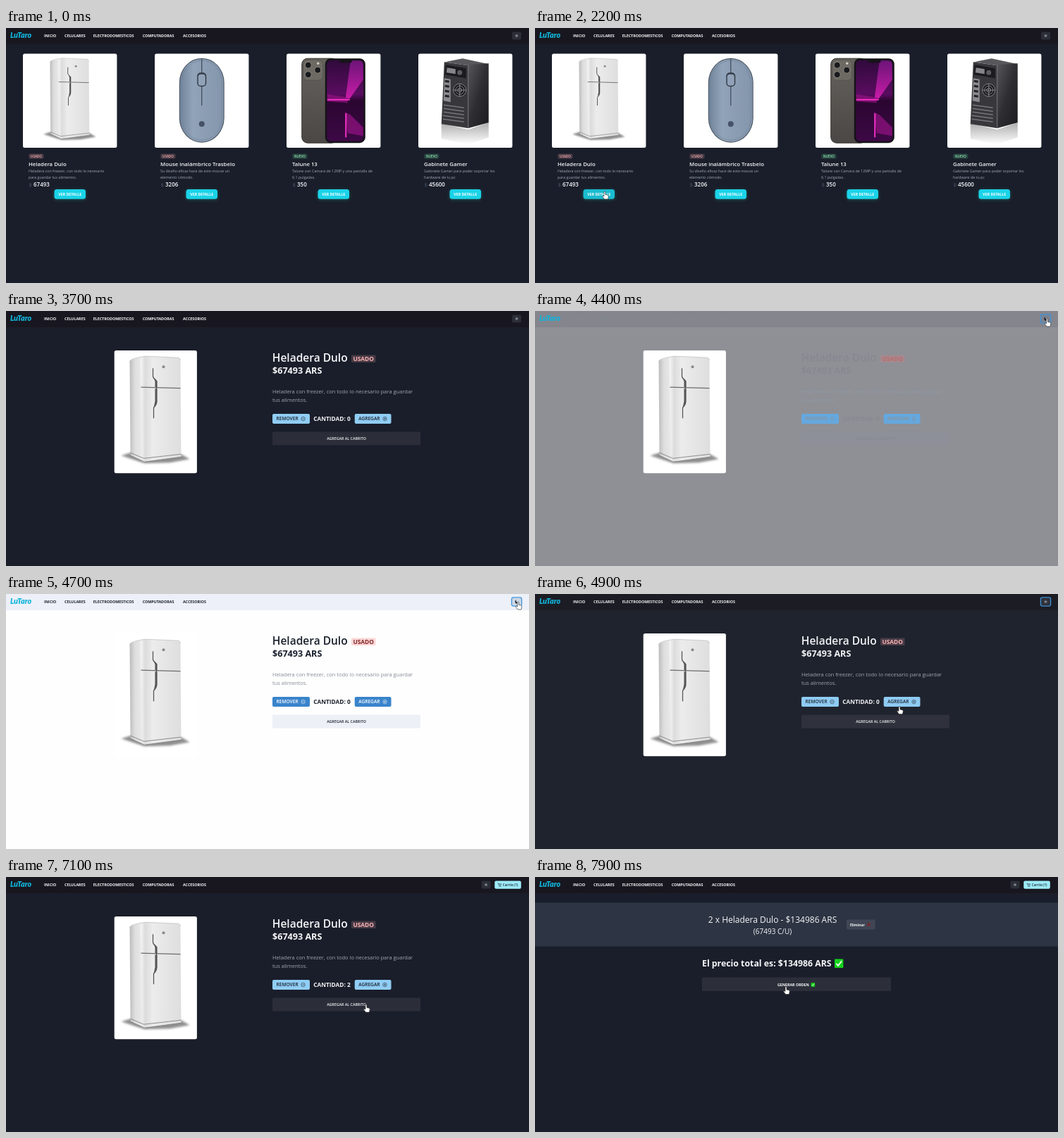
Write an HTML page that moves like this. It is 742x362 px and loops after 8000 ms.

```html
<!DOCTYPE html>
<html lang="es">
<head>
<meta charset="utf-8">
<style>
  html, body { margin: 0; width: 100%; height: 100%; overflow: hidden; background: #1a1f2b; }
  svg { display: block; width: 742px; height: 362px; font-family: "Open Sans", "Noto Sans", sans-serif; }
  text { white-space: pre; }
  .brand { font-family: Lato, sans-serif; font-style: italic; }
  .glow { filter: drop-shadow(0 1.5px 2px #1b5a58); }
  .soft { filter: blur(1.5px); }
</style>
</head>
<body>
<svg id="stage" viewBox="0 0 742 362">
  <defs>
    <linearGradient id="side"><stop stop-color="#bcbcbc"/><stop offset=".35" stop-color="#dedede"/><stop offset="1" stop-color="#ededed"/></linearGradient>
    <linearGradient id="door"><stop stop-color="#f6f6f6"/><stop offset=".12" stop-color="#dcdcdc"/><stop offset=".3" stop-color="#ececec"/><stop offset="1" stop-color="#dedede"/></linearGradient>
    <linearGradient id="shell"><stop stop-color="#71859c"/><stop offset=".3" stop-color="#91a3b8"/><stop offset="1" stop-color="#8396ac"/></linearGradient>
    <linearGradient id="graphite" x2="0" y2="1"><stop stop-color="#66625e"/><stop offset="1" stop-color="#4a4744"/></linearGradient>
    <linearGradient id="screen" x2="0" y2="1"><stop stop-color="#300a3c"/><stop offset=".42" stop-color="#5a0c60"/><stop offset=".5" stop-color="#2a0630"/><stop offset="1" stop-color="#3d0846"/></linearGradient>
    <linearGradient id="beam" x2="0" y2="1"><stop stop-color="#6d1478"/><stop offset="1" stop-color="#c81ca8"/></linearGradient>
    <linearGradient id="panel" x2="1" y2="1"><stop stop-color="#56565a"/><stop offset=".5" stop-color="#2e2e32"/><stop offset="1" stop-color="#1c1c1f"/></linearGradient>
    <linearGradient id="mirror" x2="0" y2="1"><stop stop-color="#777"/><stop offset="1" stop-color="#fff"/></linearGradient>

    <!-- Product drawings are centred on 0,0 -->
    <g id="fridge">
      <path d="M-49 62-36 58 36 60 48 67 20 72-16 73Z" fill="#6a6a6a" opacity=".75" class="soft"/>
      <path d="M-37-72Q-36-75-20-78L-16 71-36 62Z" fill="url(#side)"/>
      <path d="M-22-75Q-21-79-15-79L32-77Q35-76 35-73L36 64-16 71Q-20 71-20 67Z" fill="url(#door)"/>
      <path d="M-37-72Q-36-76-15-79L32-77Q35-76 35-73" fill="none" stroke="#bbb" stroke-width=".7"/>
      <path d="M-36 58-17 66 36 60M-36 62-16 71 36 64" fill="none" stroke="#777" stroke-width=".8"/>
      <path d="M-21-35 35-33.500" stroke="#6c6c6c" stroke-width="1.200"/>
      <path d="M-4-62V-51Q-4-48-1-46L1-43V-12Q0-9-3-6V9" fill="none" stroke="#555" stroke-width="1.300"/>
      <path d="M-3-49 2-44V-35L-1-35V-43ZM-1-33H2V-14L-3-6-1-15Z" fill="#555"/>
      <circle cx="11" cy="-64" r="2" fill="#888"/>
    </g>
    <g id="mouse">
      <rect x="-32" y="-60.500" width="64" height="120" rx="32" ry="35" fill="#525d6b"/>
      <rect x="-30.800" y="-59.300" width="61.600" height="117.600" rx="30.800" ry="34" fill="url(#shell)"/>
      <rect x="-28.500" y="-57" width="57" height="113" rx="28.500" ry="32" fill="none" stroke="#71839a" stroke-width=".7"/>
      <path d="M0-60V7" stroke="#38424f" stroke-width="1.100"/>
      <rect x="-6.500" y="-40" width="13" height="20" rx="5" fill="#343c48"/>
      <rect x="-5" y="-37.500" width="10" height="16" rx="3.500" fill="#91a2b8"/>
      <circle cy="33" r="4" fill="#465267"/>
    </g>
    <g id="phone">
      <rect x="-45" y="-60" width="50" height="120" rx="8" fill="url(#graphite)" stroke="#34322f"/>
      <rect x="-43" y="-58" width="28" height="29" rx="6" fill="#6d6963" stroke="#4c4a46" stroke-width=".6"/>
      <g fill="#191a1d" stroke="#8c8880"><circle cx="-36" cy="-50.500" r="4.500"/><circle cx="-36" cy="-37" r="4.500"/><circle cx="-22.500" cy="-43.500" r="4.500"/></g>
      <circle cx="-22" cy="-53" r="1.700" fill="#d8d2c4"/>
      <rect x="-12" y="-60" width="57" height="120" rx="8" fill="#151317"/>
      <rect x="-9.500" y="-57.500" width="52" height="115" rx="6" fill="url(#screen)"/>
      <path d="M24-57H36Q42-57 42-51V-30L23-3 17-4Z" fill="url(#beam)"/>
      <path d="M-9-9 20-5V3L-9 1ZM16 16 24 20 42 38V50L20 46Z" fill="#a5148f" opacity=".6"/>
      <path d="M-9-1.500H23M17.500 18V52" fill="none" stroke="#f431c6" stroke-width="2"/>
      <rect x="8" y="-58" width="18" height="4" rx="2" fill="#151317"/>
    </g>
    <g id="tower">
      <path d="M-34 32 4 41 33 31V52L4 62-34 54Z" fill="url(#mirror)" opacity=".6"/>
      <path d="M-29-55-4-60 33-52 4-50Z" fill="#58585c"/>
      <path d="M-30-55 4-50V39L-34 33Z" fill="#38383c"/>
      <path d="M4-51 33-53V31L4 39Z" fill="url(#panel)"/>
      <path d="M4-51V39" stroke="#77777b" stroke-width=".8"/>
      <path d="M-28-51 1-46V-32L-29-37Z" fill="#1b1b1e"/>
      <path d="M-26-47-14-45V-38L-27-40Z" fill="#85858a"/>
      <circle cx="-8" cy="-40" r="3.500" fill="#5c5c60"/>
      <path d="M-30-32-21-30.500V2L-31 0Z" fill="#8a8a90"/>
      <path d="M-29-28-23-27M-29-21-23-20M-29-14-23-13M-29-7-23-6" stroke="#222" stroke-width="3"/>
      <g fill="none" stroke="#9b9ba0" stroke-width=".8"><circle cx="-8" cy="-15" r="9" fill="#19191c"/><circle cx="-8" cy="-15" r="6"/><circle cx="-8" cy="-15" r="3"/><path d="M-17-15H1M-8-24V-6"/></g>
      <path d="M-31 6-2 10M-31 11-2 15M-31 16-2 20M-32 21-2 25M-32 26-2 30" stroke="#76767b" stroke-width="1.500"/>
    </g>
    <g id="check">
      <rect x="-6.200" y="-6.200" width="12.400" height="12.400" rx=".8" fill="#17d51c"/>
      <path d="M-3.800 0-1.200 3 4-3.500" fill="none" stroke="#fff" stroke-width="1.700"/>
    </g>
  </defs>
</svg>
<script>
const stage = document.getElementById('stage');
const LOOP = 8000;

// Theme colours: [dark, light]
const THEME = {
  bg: ['#1a1e2a', '#fefefe'], nav: ['#18171f', '#edf0f8'], ink: ['#f5f6f8', '#1a202c'],
  soft: ['#9fa5b1', '#858b98'], bar: ['#2b2e39', '#edf0f7'], blue: ['#90cdf4', '#3984cb'],
  onBlue: ['#1a202c', '#ffffff'], tag: ['#463a45', '#fed7d7'], tagInk: ['#feb2b2', '#822727'],
  toggle: ['#2b2d37', '#ccd7e4'],
};
const v = name => `var(--${name})`;

const text = (x, y, size, weight, str, fill = v('ink'), extra = '') =>
  `<text x="${x}" y="${y}" font-size="${size}" font-weight="${weight}" style="fill:${fill}" ${extra}>${str}</text>`;
const mid = 'text-anchor="middle"';
const rect = (x, y, w, h, r, fill, extra = '') =>
  `<rect x="${x}" y="${y}" width="${w}" height="${h}" rx="${r}" style="fill:${fill}" ${extra}/>`;
const use = (id, x, y, scale = 1) => `<use href="#${id}" transform="translate(${x} ${y}) scale(${scale})"/>`;
const ring = (id, x, y, w, h) =>
  rect(x, y, w, h, 2.5, 'none', `id="${id}" stroke="#3f94da" stroke-width="1.3"`);
const group = (id, body) => `<g id="${id}">${body}</g>`;

function card(i, drawing, scale, isNew, title, line1, line2, price) {
  const x = 24 + i * 187;
  const [tag, tagFill, tagInk] = isNew ? ['NUEVO', '#26433f', '#9ae6b4'] : ['USADO', '#463a45', '#feb2b2'];
  return rect(x, 36.5, 133.4, 133.5, 2.5, '#fff') + use(drawing, x + 66.75, 103.2, scale)
    + rect(x + 8.3, 178.5, 21.2, 7.2, 2, tagFill) + text(x + 18.9, 183.8, 4.5, 600, tag, tagInk, mid)
    + text(x + 8, 196.4, 7.8, 600, title)
    + text(x + 8, 205.3, 5.3, 400, line1, v('soft')) + text(x + 8, 213.8, 5.3, 400, line2, v('soft'))
    + text(x + 8.5, 225.4, 8, 400, '$', '#4a5568') + text(x + 15, 225.4, 8, 600, price)
    + rect(x + 44.5, 229, 44.5, 13.8, 3.5, '#1bd3e8', `id="buy${i}" class="glow"`)
    + text(x + 66.75, 237.8, 5.2, 700, 'VER DETALLE', '#fff', mid);
}

const navItems = [[54, 'INICIO'], [83, 'CELULARES'], [123.7, 'ELECTRODOMESTICOS'], [193.7, 'COMPUTADORAS'], [251, 'ACCESORIOS']];
const rays = Array.from({ length: 8 }, (_, i) =>
  `<path d="M0-1.7V-2.5" stroke="#9a9da5" stroke-width=".6" transform="rotate(${i * 45})"/>`).join('');

const nav = rect(0, 0, 742, 23, 0, v('nav'))
  + text(6, 14.3, 10.8, 900, 'LuTaro', '#11b5dc', 'class="brand"')
  + navItems.map(([x, label]) => text(x, 13.1, 5.35, 700, label)).join('')
  + group('toggle', rect(718, 5.5, 13, 11, 2, v('toggle'))
    + group('sun', `<g transform="translate(724.5 11)"><circle r="1.3" fill="#9a9da5"/>${rays}</g>`)
    + group('moon', '<path d="M724 8.600A2.500 2.500 0 1 0 727 12 2.400 2.400 0 0 1 724 8.600" fill="#1a202c"/>')
    + ring('toggleRing', 717.4, 4.9, 14.2, 12.2))
  + group('cart', rect(693.3, 5.5, 37.5, 11.2, 2, '#9decf9')
    + '<path d="M697.500 9H698.600L699.500 12H702L702.500 9.800H699" fill="none" stroke="#1a202c" stroke-width=".6"/><circle cx="699.800" cy="13.200" r=".5"/><circle cx="701.800" cy="13.200" r=".5"/>'
    + text(704.8, 12.9, 4.5, 600, 'Carrito (1)', '#1a202c'));

const home = card(0, 'fridge', .765, false, 'Heladera Dulo', 'Heladera con freezer, con todo lo necesario', 'para guardar tus alimentos.', '67493')
  + card(1, 'mouse', 1, false, 'Mouse inalámbrico Trasbelo', 'Su diseño eficaz hace de este mouse un', 'elemento cómodo.', '3206')
  + card(2, 'phone', 1, true, 'Talune 13', 'Talune con Camara de 12MP y una pantalla de', '6.1 pulgadas.', '350')
  + card(3, 'tower', 1, true, 'Gabinete Gamer', 'Gabinete Gamer para poder soportar los', 'hardware de tu pc', '45600');

const blueButton = (x, w, label, iconX, sign) => rect(x, 146, w, 14, 2, v('blue'))
  + text(x + 5.5, 155.4, 6.6, 600, label, v('onBlue'))
  + `<g fill="none" style="stroke:${v('onBlue')}" stroke-width=".6"><circle cx="${iconX}" cy="153" r="2.700"/><path d="M${iconX - 1.4} 153h2.8${sign}"/></g>`;

const detail = rect(153.7, 56, 117.2, 174.3, 2.5, '#fff') + use('fridge', 212.5, 143.2)
  + text(377.8, 71.8, 15.5, 600, 'Heladera Dulo')
  + rect(490, 62.5, 34.5, 10.4, 1.2, v('tag')) + text(507.2, 70.6, 8.4, 700, 'USADO', v('tagInk'), mid)
  + text(378, 88.8, 12.6, 700, '$67493 ARS')
  + text(378, 116.5, 7.5, 400, 'Heladera con freezer, con todo lo necesario para guardar', v('soft'))
  + text(378, 129.3, 7.5, 400, 'tus alimentos.', v('soft'))
  + blueButton(378, 53, 'REMOVER', 421.5, '')
  + text(436.3, 156, 8.3, 700, 'CANTIDAD: 0', v('ink'), 'id="quantity"')
  + blueButton(494.7, 51.8, 'AGREGAR', 537.5, 'm-1.4-1.4v2.8')
  + ring('addRing', 494.2, 145.5, 52.8, 15)
  + rect(378, 171.4, 210, 19.2, 1.5, v('bar')) + text(483, 182.9, 5.3, 600, 'AGREGAR AL CARRITO', v('ink'), mid);

const order = rect(0, 36.5, 742, 62, 0, '#2d3443')
  + text(337, 64.6, 12, 400, '2 x Heladera Dulo - $134986 ARS', v('ink'), mid)
  + text(337, 81, 10, 400, '(67493 C/U)', v('ink'), mid)
  + rect(442, 60.5, 40.6, 14, 2, '#404654') + text(447, 69.6, 5, 700, 'Eliminar')
  + '<path d="M471.300 65.300l4.400 4.400m0-4.400l-4.400 4.400" stroke="#8c1c26" stroke-width="1.100"/>'
  + text(237, 127, 12.3, 700, 'El precio total es: $134986 ARS') + use('check', 431.2, 122.8)
  + rect(237, 142.5, 268, 19.4, 1.5, '#2c2f3a')
  + text(366.4, 154.9, 5.3, 700, 'GENERAR ORDEN', v('ink'), mid) + use('check', 394.4, 153, .44);

const hand = '<path d="M-1 0Q0-1 1 0V4L4 4.600Q5.500 5 5.300 6.500L4.500 10.500H-.5L-3.300 6.800Q-3.500 5.400-2 5.700L-1 6.500Z" fill="#fff" stroke="#222" stroke-width=".6"/>';

stage.insertAdjacentHTML('beforeend', rect(0, 0, 742, 362, 0, v('bg'))
  + group('home', home) + group('detail', detail) + group('order', order) + group('nav', nav) + group('hand', hand));

// The hand shows only over controls; each path is a list of [time, x, y].
const handPaths = [
  [[1900, 105, 236], [2100, 99, 232.5], [2500, 99, 232.5]],
  [[4250, 724, 13], [4400, 726.5, 11.5], [4750, 726.5, 11.5]],
  [[4850, 519, 158], [4900, 517, 160], [5100, 520, 154], [5600, 520, 154]],
  [[5750, 512, 174], [6000, 506, 182], [6600, 506, 182], [6900, 520, 180], [7300, 502, 183], [7500, 502, 183]],
  [[7700, 366, 150], [7900, 356, 156], [8000, 356, 156]],
];

const clamp = x => Math.min(1, Math.max(0, x));
const progress = (t, from, to) => clamp((t - from) / (to - from));
const smooth = u => u * u * (3 - 2 * u);
const channels = hex => [1, 3, 5].map(i => parseInt(hex.slice(i, i + 2), 16));
const mix = ([a, b], m) => {
  const to = channels(b);
  return `rgb(${channels(a).map((c, i) => Math.round(c + (to[i] - c) * m))})`;
};
const el = id => document.getElementById(id);
const show = (id, on) => { el(id).style.display = on ? '' : 'none'; };

function placeHand(t) {
  const path = handPaths.find(p => t >= p[0][0] && t < p.at(-1)[0]);
  show('hand', path);
  if (!path) return;
  const i = path.findIndex(p => p[0] > t);
  const [t0, x0, y0] = path[i - 1], [t1, x1, y1] = path[i];
  const u = smooth(progress(t, t0, t1));
  el('hand').setAttribute('transform', `translate(${x0 + (x1 - x0) * u} ${y0 + (y1 - y0) * u})`);
}

function draw(t) {
  const light = t < 4720 ? smooth(progress(t, 4300, 4500)) : (1 - progress(t, 4720, 4970)) ** 3;
  for (const name in THEME) stage.style.setProperty('--' + name, mix(THEME[name], light));

  show('home', t < 2500);
  show('detail', t >= 3000 && t < 7500);
  show('order', t >= 7500);

  const isLight = t >= 4300 && t < 4720;
  show('moon', isLight);
  show('sun', !isLight);
  show('toggleRing', t >= 4300 && t < 5100);
  show('addRing', t >= 5100 && t < 6300);
  show('cart', t >= 6300);
  el('toggle').setAttribute('transform', `translate(${t >= 6300 ? -43.5 : 0} 0)`);

  el('buy0').style.fill = t >= 1900 ? '#1abcd0' : '#1bd3e8';
  el('quantity').textContent = 'CANTIDAD: ' + (t < 5100 ? 0 : t < 5400 ? 1 : 2);
  placeHand(t);
}

const start = performance.now();
function tick() {
  draw((performance.now() - start) % LOOP);
  requestAnimationFrame(tick);
}
tick();
</script>
</body>
</html>
```
